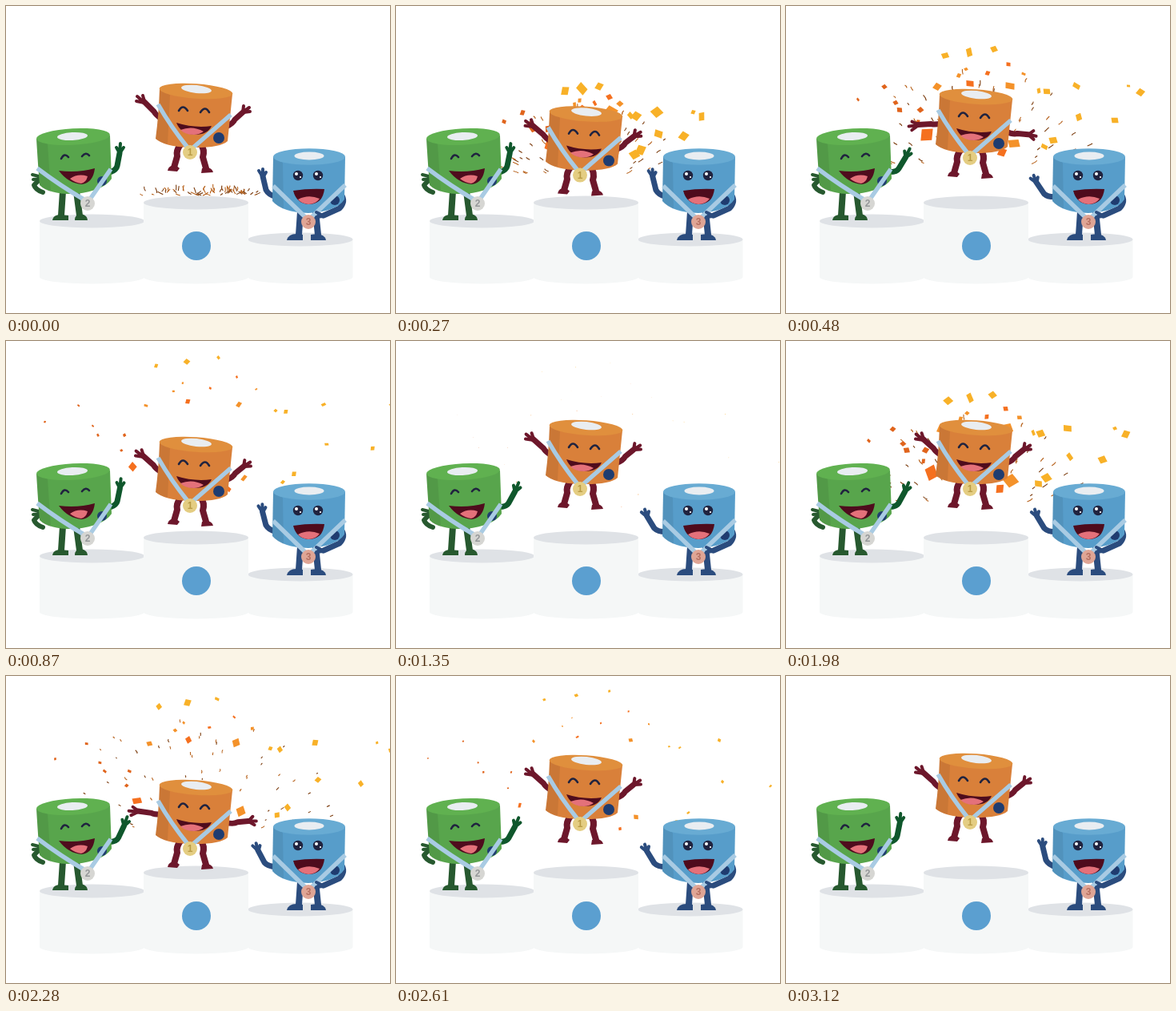
Write an HTML page with a canvas that moves like this. It is 480x384 px and loops after 3150 ms.

```html
<!DOCTYPE html>
<html lang="en">
<head>
<meta charset="utf-8">
<title>Podium party</title>
<style>
  html, body { margin: 0; width: 100%; height: 100%; overflow: hidden; background: #fff; }
  canvas, svg { position: absolute; left: 0; top: 0; width: 480px; height: 384px; }
  .limb { fill: none; stroke: currentColor; stroke-width: 8; stroke-linecap: round; stroke-linejoin: round; }
  .hand { fill: none; stroke: currentColor; stroke-width: 4; stroke-linecap: round; }
  .foot { fill: currentColor; }
  .ribbon { fill: none; stroke: #a9cbe3; stroke-width: 5.5; }
  .smile { fill: none; stroke: #20233f; stroke-width: 2.6; stroke-linecap: round; }
  .mouth { fill: #4f0c1d; }
  .tongue { fill: #e4717a; }
  .label { fill: #e9edf1; }
  .badge { fill: #1f3c70; }
  .shade { fill: #000; opacity: .07; }
  .dark { fill: #20233f; }
  .white { fill: #fff; }
  text { font: bold 12px "Liberation Sans", Arial, sans-serif; text-anchor: middle; }
</style>
</head>
<body>
<canvas id="confetti" width="480" height="384"></canvas>
<svg viewBox="0 0 480 384">
  <g id="podium"></g>
  <circle cx="238" cy="300" r="18" fill="#5b9fd0"/>

  <g id="green">
    <g color="#27592f">
      <path class="limb" d="M71 232L69 262M88 232L92 262"/>
      <path class="foot" d="M58 268Q59 261 68 261L78 262L78 268ZM86 268Q86 260 94 260Q102 262 102 268Z"/>
      <path class="limb" stroke-width="6" style="stroke-width:6" d="M49 213Q39 219 35 224Q37 230 46 233"/>
      <path class="hand" d="M45 214L33 211M44 216L34 217"/>
    </g>
    <g id="greenArm" color="#0f572c">
      <path class="limb" style="stroke-width:7" d="M130 208Q138 205 139 200L142 184"/>
      <path class="hand" d="M142 184L138 177M142 183L143 172M143 183L147 177"/>
    </g>
    <path fill="#58a54c" d="M38 166Q40 200 42 224Q54 236 88 235Q122 231 132 216Q131 190 130 162Z"/>
    <path class="shade" d="M38 166L42 224Q47 230 56 233L52 172Z"/>
    <ellipse cx="84" cy="163.5" rx="46" ry="10.3" fill="#60b150" transform="rotate(-3 84 163.5)"/>
    <ellipse class="label" cx="83" cy="163" rx="19" ry="5" transform="rotate(-3 83 163)"/>
    <path class="smile" d="M69 191Q73 183 78 189M95 188Q100 182 104 187"/>
    <path class="mouth" d="M66 206Q90 209 111 203Q109 221 95 223Q78 222 66 206Z"/>
    <path class="tongue" d="M80 216Q90 209 102 213Q100 221 94 222Q86 221 80 216Z"/>
    <circle class="badge" cx="120" cy="219" r="6"/>
    <path class="ribbon" d="M39 203Q68 225 99 243M131 204L104 243"/>
    <circle cx="102" cy="247" r="9" fill="#d6d6d3"/>
    <text x="102" y="251.3" fill="#96989a">2</text>
  </g>

  <g id="blue">
    <g color="#2b4c7e">
      <path class="limb" d="M368 257L366 286M387 257L390 286"/>
      <path class="foot" d="M351 293Q353 285 363 285L371 286L371 293ZM381 293L381 286Q398 283 400 293Z"/>
      <path class="limb" style="stroke-width:7" d="M419 236Q425 244 417 253L397 262"/>
    </g>
    <g id="blueArm" color="#2b4c7e">
      <path class="limb" style="stroke-width:7" d="M338 239Q328 236 325 230L321 213"/>
      <path class="hand" d="M321 214L316 206M321 213L321 204M322 213L325 208"/>
    </g>
    <path fill="#579dca" d="M334 189L333 244Q345 258 378 259Q413 257 423 242L424 189Z"/>
    <path class="shade" d="M334 189L333 244Q338 250 347 254L346 196Z"/>
    <ellipse cx="379" cy="188.5" rx="45" ry="10.3" fill="#68abd3"/>
    <ellipse class="label" cx="379" cy="187.5" rx="18.5" ry="5"/>
    <circle class="dark" cx="365" cy="212" r="6.2"/><circle class="dark" cx="390" cy="212" r="6.2"/>
    <circle class="white" cx="363" cy="210" r="2"/><circle class="white" cx="388" cy="210" r="2"/>
    <circle class="white" cx="368" cy="214" r="1.1"/><circle class="white" cx="393" cy="214" r="1.1"/>
    <path class="mouth" d="M359 231Q378 228 398 229Q396 248 378 248Q363 247 359 231Z"/>
    <path class="tongue" d="M365 242Q378 235 392 241Q387 248 378 248Q369 247 365 242Z"/>
    <circle class="badge" cx="411" cy="243" r="6"/>
    <path class="ribbon" d="M334 225L374 264M424 224L382 264"/>
    <path class="hand" color="#2b4c7e" d="M396 262L388 258M396 263L388 264"/>
    <circle cx="378" cy="270" r="9" fill="#dfa595"/>
    <text x="378" y="274.3" fill="#b66f60">3</text>
  </g>

  <g id="orange">
    <g color="#6d172b">
      <path class="limb" d="M219 172Q212 181 214 188L210 202M243 172Q249 180 246 189L250 203"/>
      <path class="foot" d="M202 206Q203 199 212 199L217 203L214 207ZM244 209L245 203Q257 200 259 208Z"/>
      <g id="armL">
        <path class="limb" style="stroke-width:7" d="M194 141Q187 136 185 132L173 120"/>
        <path class="hand" d="M173 121L163 119M172 120L164 113M173 119L171 112"/>
      </g>
      <g id="armR">
        <path class="limb" style="stroke-width:7" d="M275 151Q284 147 286 142L296 133"/>
        <path class="hand" d="M296 133L297 125M297 132L304 127M297 133L305 132"/>
      </g>
    </g>
    <path fill="#d9803a" d="M192 104Q191 136 187 166Q198 176 230 177Q267 178 277 169L283 110Z"/>
    <path class="shade" d="M192 104Q191 136 187 166Q193 171 202 173L205 111Z"/>
    <ellipse cx="237.5" cy="106.5" rx="46" ry="9.3" fill="#e08f3d" transform="rotate(4 237.5 106.5)"/>
    <ellipse class="label" cx="238" cy="104" rx="19" ry="5" transform="rotate(6 238 104)"/>
    <path class="smile" d="M216 131Q221 122 227 131M243 133Q249 124 254 133"/>
    <path class="mouth" d="M213 146Q235 153 257 150Q252 161 236 161Q218 160 213 146Z"/>
    <path class="tongue" d="M218 155Q233 149 247 157Q241 161 235 161Q224 161 218 155Z"/>
    <circle class="badge" cx="266" cy="165" r="7"/>
    <path class="ribbon" d="M190 123Q206 151 227 177M281 136L234 177"/>
    <circle cx="230" cy="183" r="9" fill="#e4cd82"/>
    <text x="230" y="187.3" fill="#b99b45">1</text>
  </g>
</svg>
<script>
const LOOP = 3150, JUMP = 630, WAVE = 315, BURST = 1575, STEP = 30;
const $ = id => document.getElementById(id);

const drum = (x, y, w, base) => `
  <path fill="#f5f7f7" d="M${x - w} ${y}V${base - 8}A${w} 8.5 0 0 0 ${x + w} ${base - 8}V${y}Z"/>
  <ellipse cx="${x}" cy="${y}" rx="${w}" ry="8.5" fill="#dfe2e6"/>`;
$("podium").innerHTML = drum(107.5, 269, 65.5, 347) + drum(368, 292, 65.5, 347) + drum(237.5, 246, 65.5, 347);

// [time, value] tables
const lift = [[0, 0], [90, 2], [160, 9], [240, 23], [310, 36], [350, 39], [390, 33], [435, 18], [480, 7], [540, 1.5], [600, 0], [630, 0]];
const flap = [[0, 0], [90, 3], [240, 3], [310, 6], [370, 28], [420, 50], [480, 48], [540, 26], [600, 3], [630, 0]];
const wave = [[0, 0], [40, 7], [90, 18], [160, 22], [200, 12], [240, 1], [315, 0]];

function track(keys, t) {
  const i = keys.findIndex(k => k[0] > t);
  const [t0, a] = keys[i - 1], [t1, b] = keys[i];
  return a + (b - a) * (t - t0) / (t1 - t0);
}

function random(seed) {
  return () => (seed = (seed * 16807) % 2147483647) / 2147483647;
}
const rnd = random(77);

// x, y and size of each piece in mid-burst
const spots = [
  229, 58, 10, 260, 54, 7, 199, 62, 8, 189, 101, 8, 176, 161, 14, 285, 172, 13,
  270, 183, 9, 280, 100, 11, 326, 107, 8, 316, 106, 6, 363, 100, 9, 366, 139, 8,
  411, 143, 8, 443, 108, 8, 428, 100, 4, 334, 168, 9, 323, 176, 8, 123, 101, 5,
  137, 121, 5, 142, 130, 6, 168, 130, 6, 165, 145, 5, 230, 97, 9, 216, 87, 5,
  252, 84, 5, 225, 79, 4, 278, 73, 5, 297, 85, 5, 90, 117, 4
];
const pieces = [];
for (let i = 0; i < spots.length; i += 3) {
  const [x, y, size] = spots.slice(i, i + 3);
  const color = x > 310 || y < 70 ? "#f8b128" : x < 170 ? "#e0641c" : i % 2 ? "#f4922a" : "#f5701f";
  pieces.push({ x, y, size, color, turn: rnd() * 6, spin: 2 + rnd() * 4 });
}
const strands = Array.from({ length: 62 }, () => {
  const a = Math.PI * (1.02 + rnd() * .96), r = 55 + rnd() * 75;
  return {
    x: 240 + Math.cos(a) * r * 1.15, y: 207 + Math.sin(a) * r,
    from: 170 + rnd() * 145, bend: rnd() * 4 - 2, len: 3 + rnd() * 5,
    color: rnd() < .5 ? "#7d3e10" : "#b8641f"
  };
});

const ctx = $("confetti").getContext("2d");
const spread = s => 1.45 * (1 - Math.exp(-s / .41));

function drawPiece(p, s) {
  const e = spread(s), k = p.size * (1 - s / 1.42) / .66 * Math.min(1, s / .15);
  if (k <= 0) return;
  ctx.save();
  ctx.translate(240 + (p.x - 240) * e, 222 + (p.y - 222) * e + 25 * (s * s - .23) * Math.min(1, s * 4));
  ctx.rotate(p.turn + p.spin * s);
  ctx.transform(1, .15, 0, .55 + .45 * Math.abs(Math.cos(p.turn + s * p.spin * 1.5)), 0, 0);
  ctx.fillStyle = p.color;
  ctx.fillRect(-k / 2, -k / 2, k, k);
  ctx.restore();
}

function drawStrand(p, s) {
  const e = spread(s + .02), fade = Math.min(1, (.85 - s) / .25);
  if (fade <= 0) return;
  const home = p.from + (240 - p.from) * Math.min(1, s * 3);
  const x = home + (p.x - home) * e, y = 240 + (p.y - 240) * e;
  const dx = p.x - 240, dy = p.y - 240, d = Math.hypot(dx, dy);
  const ux = dx / d * p.len * fade, uy = dy / d * p.len * fade;
  ctx.strokeStyle = p.color;
  ctx.beginPath();
  ctx.moveTo(x, y);
  ctx.quadraticCurveTo(x + ux / 2 + p.bend, y + uy / 2, x + ux, y + uy);
  ctx.stroke();
}

const turn = (id, deg, x, y) => $(id).setAttribute("transform", `rotate(${deg} ${x} ${y})`);

function draw(t) {
  const j = t % JUMP, swing = track(wave, t % WAVE), arms = track(flap, j);
  $("orange").setAttribute("transform", `translate(0 ${track(lift, j)})`);
  turn("armL", -arms, 193, 140);
  turn("armR", arms, 276, 151);
  turn("greenArm", swing, 131, 207);
  turn("blueArm", -swing, 337, 239);

  const s = (t % BURST) / 1000;
  ctx.clearRect(0, 0, 480, 384);
  ctx.lineWidth = 1.1;
  strands.forEach(p => drawStrand(p, s));
  pieces.forEach(p => drawPiece(p, s));
}

const start = performance.now();
function tick() {
  const t = (performance.now() - start) % LOOP;
  draw(Math.floor(t / STEP) * STEP);
  requestAnimationFrame(tick);
}
tick();
</script>
</body>
</html>
```
